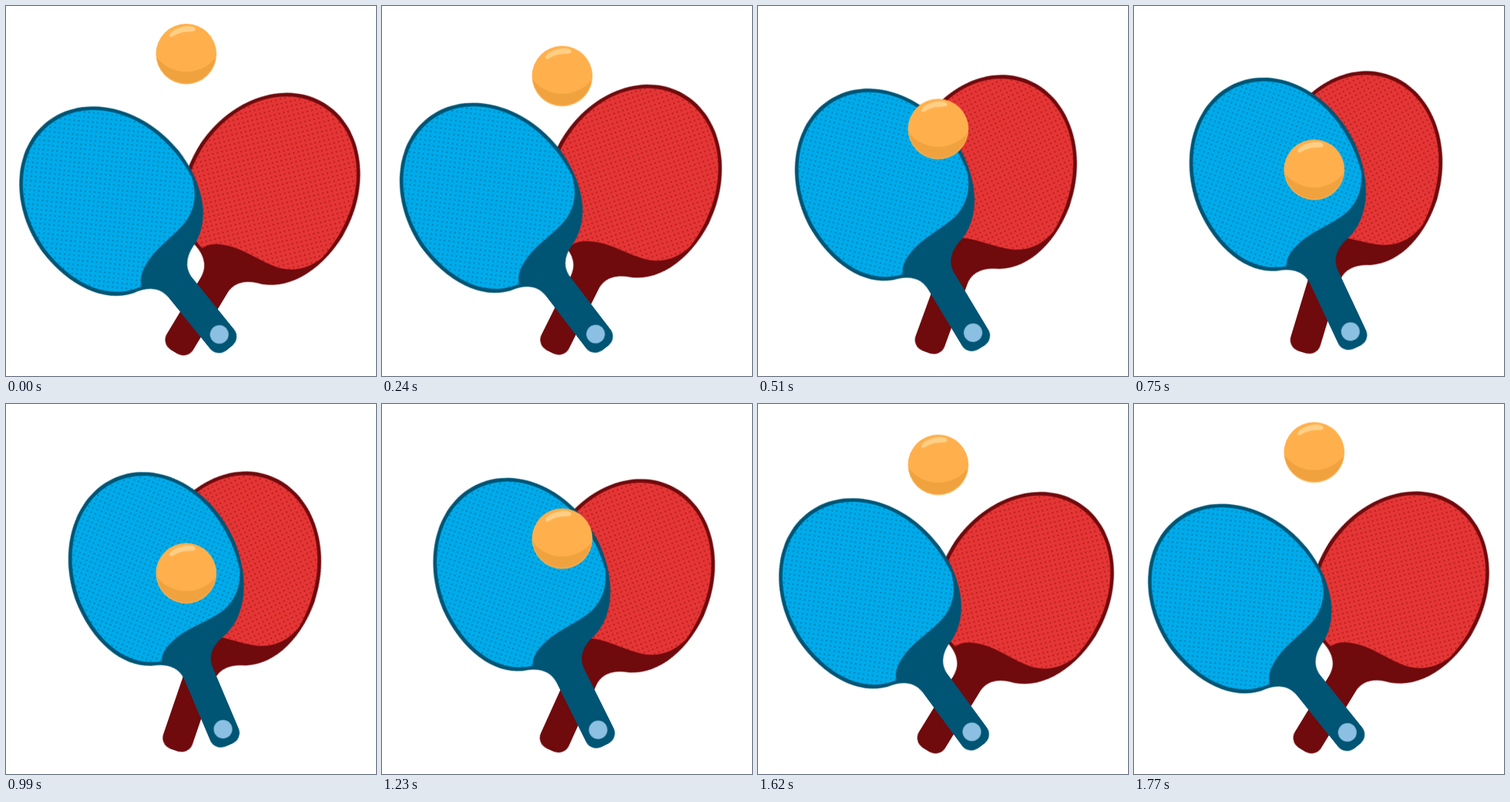
Animation of 480 by 480 pixels, one loop 1800 ms. Source, as an HTML page:

```html
<!DOCTYPE html>
<html lang="en">
<head>
<meta charset="utf-8">
<title>Table tennis</title>
<style>
  html, body { margin: 0; width: 100%; height: 100%; overflow: hidden; background: #fff; }
  svg { display: block; width: 100%; height: 100%; }
  #red { transform-origin: 220px 448px; }
  #blue { transform-origin: 294px 441px; }
</style>
</head>
<body>
<svg viewBox="0 0 480 480">
  <defs>
    <!-- Paddle parts: handle end at the origin, blade pointing up -->
    <path id="body" d="M0 0H5A15 15 0 0 0 20-15V-100C20-118 32-127 46-132C82-141 109-183 110-241
      C110-315 61-377 0-377C-61-377-110-315-110-241C-109-183-82-141-46-132
      C-32-127-20-118-20-100V-15A15 15 0 0 0-5 0Z"/>
    <path id="rubber" d="M-38-134C-79-144-104-185-105-241C-105-313-59-372 0-372
      C59-372 105-313 105-241C105-229 104-217 102-205C95-184 80-168 58-163
      C34-158 18-161-4-156C-24-151-34-144-38-134Z"/>
    <pattern id="redDots" width="6" height="6" patternUnits="userSpaceOnUse" patternTransform="rotate(45)">
      <circle cx="3" cy="3" r=".85" fill="#6f0a0d"/>
    </pattern>
    <pattern id="blueDots" width="6" height="6" patternUnits="userSpaceOnUse" patternTransform="rotate(45)">
      <circle cx="3" cy="3" r=".85" fill="#005474"/>
    </pattern>
  </defs>

  <g id="red">
    <g transform="translate(218 448.6) rotate(31.8)">
      <use href="#body" fill="#6f0a0d"/>
      <use href="#rubber" fill="#e63535"/>
      <use href="#rubber" fill="url(#redDots)"/>
    </g>
  </g>

  <g id="blue">
    <g transform="translate(289.8 443.8) rotate(-39.2)">
      <use href="#body" fill="#005474"/>
      <use href="#rubber" fill="#00abeb"/>
      <use href="#rubber" fill="url(#blueDots)"/>
      <circle cx="1" cy="-22" r="12" fill="#8cc0e2"/>
    </g>
  </g>

  <g id="ball">
    <g transform="translate(233.8 62.3)">
      <circle r="39.3" fill="#ffb04d"/>
      <path d="M-38 5A49 49 0 0 0 38 5A38.4 38.4 0 0 1-38 5Z" fill="#f0a23f"/>
      <path d="M-22-24C-20-30-12-34 0-36Q11-37 12-32Q12-29 6-29C-6-29-12-26-17-23Q-21-21-22-24Z" fill="#ffcf85"/>
    </g>
  </g>
</svg>
<script>
  const HALF = 900; // one swing; the way back takes as long

  // [id, end pose, offset of the swing in ms]
  const swings = [
    ['ball', 'translate(0px, 162px)', 0],
    ['red', 'rotate(-15deg)', -120],
    ['blue', 'rotate(16.3deg)', 60 - 2 * HALF],
  ];

  for (const [id, end, delay] of swings) {
    const start = end.replace(/-?[\d.]+(?=px|deg)/g, '0');
    document.getElementById(id).animate(
      [{ transform: start }, { transform: end }],
      {
        duration: HALF,
        delay,
        iterations: Infinity,
        direction: 'alternate',
        easing: 'cubic-bezier(.3333, 0, .6667, 1)',
      }
    );
  }
</script>
</body>
</html>
```
